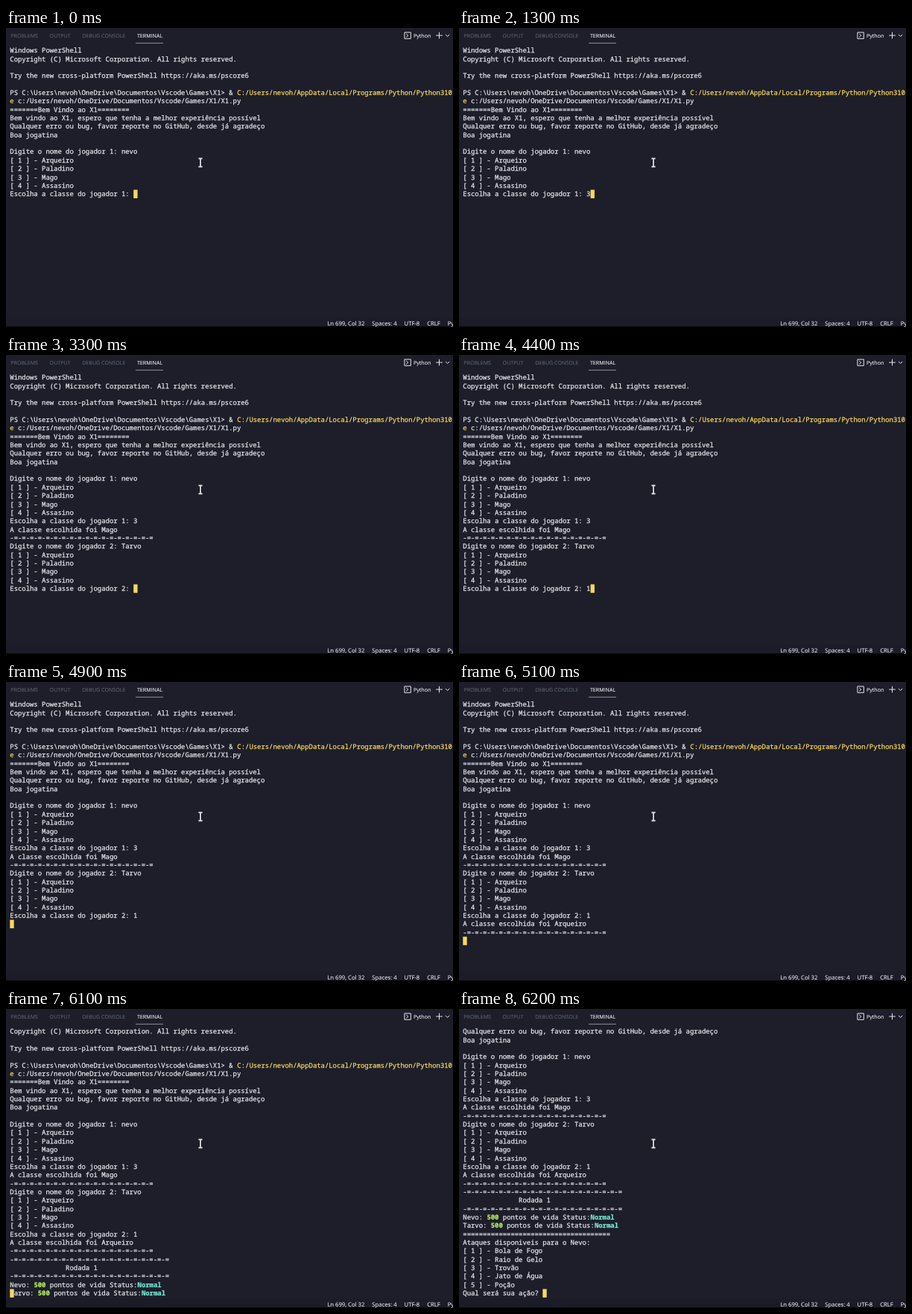
An HTML page with a canvas that plays this animation: 600 px wide and 402 px high, repeating every 8000 ms.

```html
<!DOCTYPE html>
<html lang="pt">
<head>
<meta charset="utf-8">
<title>Terminal</title>
<style>
html, body { margin: 0; width: 100%; height: 100%; overflow: hidden; background: #1d1e2a; }
canvas { display: block; width: 600px; height: 402px; }
</style>
</head>
<body>
<canvas id="stage"></canvas>
<script>
const W = 600, H = 402, LOOP = 8000;
const BG = '#1d1e2a', FG = '#e6e7ec', DIM = '#5c5f6d';
const YELLOW = '#fbd85c', GREEN = '#b5ea62', CYAN = '#74e6d4';
const MONO = '"Noto Sans Mono", "DejaVu Sans Mono", monospace';
const UI = '"Open Sans", "Noto Sans", sans-serif';
const SIZE = 8.92, CELL = SIZE * 0.6, LINE = 11.355;
const LEFT = 5.3, TOP = 24.5, BASE = 8.7, ROWS = 32;

const canvas = document.getElementById('stage');
const ctx = canvas.getContext('2d');
const dpr = window.devicePixelRatio || 1;
canvas.width = W * dpr;
canvas.height = H * dpr;
ctx.scale(dpr, dpr);
ctx.textRendering = 'geometricPrecision';
ctx.lineJoin = 'round';

// The session: each print or key press records the screen from that moment on.
// A row is a plain string or a list of [text, color, bold] spans.
const lines = [], screens = [];

function record(at, col = lines.at(-1).length) {
  screens.push({ at, col, lines: [...lines] });
}

function print(at, rows, col) {
  if (lines.at(-1) === '') lines.pop();
  lines.push(...rows);
  record(at, col);
}

function type(at, keys, pace = 65) {
  [...keys].forEach((key, i) => {
    lines.push(lines.pop() + key);
    record(at + i * pace);
  });
}

const menu = names => names.map((name, i) => `[ ${i + 1} ] - ${name}`);
const rule = n => '-='.repeat(n);
const chosen = name => ['A classe escolhida foi ' + name, rule(18)];
const choose = player => [
  ...menu(['Arqueiro', 'Paladino', 'Mago', 'Assasino']),
  `Escolha a classe do jogador ${player}: `
];
const health = name => [
  [name + ': '], ['500', GREEN, true],
  [' pontos de vida Status:'], ['Normal', CYAN, true]
];

print(0, [
  'Windows PowerShell',
  'Copyright (C) Microsoft Corporation. All rights reserved.',
  '',
  'Try the new cross-platform PowerShell https://aka.ms/pscore6',
  '',
  [['PS C:\\Users\\nevoh\\OneDrive\\Documentos\\Vscode\\Games\\X1> & '],
   ['C:/Users/nevoh/AppData/Local/Programs/Python/Python310/python.ex', YELLOW]],
  [['e', YELLOW], [' c:/Users/nevoh/OneDrive/Documentos/Vscode/Games/X1/X1.py']],
  '=======Bem Vindo ao X1========',
  'Bem vindo ao X1, espero que tenha a melhor experiência possível',
  'Qualquer erro ou bug, favor reporte no GitHub, desde já agradeço',
  'Boa jogatina',
  '',
  'Digite o nome do jogador 1: nevo',
  ...choose(1)
]);
type(1200, '3');
print(1600, [...chosen('Mago'), 'Digite o nome do jogador 2: ']);
type(2600, 'T');
type(2900, 'arvo');
print(3300, choose(2));
type(4400, '1');
print(4900, ['']);
print(5000, [...chosen('Arqueiro'), '']);
print(5900, [rule(20), '']);
print(6000, [' '.repeat(14) + 'Rodada 1', rule(20), '']);
print(6100, [health('Nevo'), health('Tarvo')], 0);
print(6200, [
  '='.repeat(37),
  'Ataques disponiveis para o Nevo:',
  ...menu(['Bola de Fogo', 'Raio de Gelo', 'Trovão', 'Jato de Água', 'Poção']),
  'Qual será sua ação? '
]);

// The thin outline gives the text its medium weight.
function text(str, x, y, font, color, weight = 0.25) {
  ctx.font = font;
  ctx.fillStyle = ctx.strokeStyle = color;
  ctx.lineWidth = weight;
  ctx.fillText(str, x, y);
  ctx.strokeText(str, x, y);
}

// Sets labels side by side with an even gap.
function flow(labels, x, y, gap, size, color) {
  for (const label of labels) {
    text(label, x, y, `${size}px ${UI}`, color(label), 0.12);
    x += ctx.measureText(label).width + gap;
  }
}

function stroke(color, width, ...paths) {
  ctx.strokeStyle = color;
  ctx.lineWidth = width;
  ctx.beginPath();
  for (const [start, ...rest] of paths) {
    ctx.moveTo(...start);
    rest.forEach(p => ctx.lineTo(...p));
  }
  ctx.stroke();
}

function drawRow(row, y) {
  let col = 0;
  for (const [str, color = FG, bold] of typeof row === 'string' ? [[row]] : row) {
    text(str, LEFT + col * CELL, y, `${bold ? 'bold ' : ''}${SIZE}px ${MONO}`, color);
    col += str.length;
  }
}

function drawTerminal(t) {
  const { lines, col } = screens.findLast(s => s.at <= t);
  const visible = lines.slice(-ROWS);
  visible.forEach((row, i) => drawRow(row, TOP + i * LINE + BASE));
  ctx.fillStyle = YELLOW;
  ctx.fillRect(LEFT + col * CELL, TOP + (visible.length - 1) * LINE, CELL, LINE);
}

function drawTabs() {
  flow(['PROBLEMS', 'OUTPUT', 'DEBUG CONSOLE', 'TERMINAL'], 6.3, 12.7, 15.6, 7.1,
    label => label === 'TERMINAL' ? FG : DIM);
  stroke('#8d909c', 1, [[174, 20.3], [211, 20.3]]);

  ctx.strokeStyle = FG;
  ctx.lineWidth = 1;
  ctx.strokeRect(534.9, 5.9, 8.4, 8.4);
  flow(['Python'], 547, 12.7, 0, 7.1, () => FG);
  stroke(FG, 1,
    [[537.2, 7.8], [539.8, 10.1], [537.2, 12.4]],
    [[577.2, 10], [585.8, 10]], [[581.5, 5.7], [581.5, 14.3]],
    [[590, 8.8], [592.6, 11.4], [595.2, 8.8]]);
}

function drawStatus() {
  ctx.fillStyle = '#1b1c28';
  ctx.fillRect(0, 389, W, H - 389);
  ctx.fillStyle = '#08080c';
  ctx.fillRect(0, H - 1, W, 1);
  flow(['Ln 699, Col 32', 'Spaces: 4', 'UTF-8', 'CRLF', 'Python'],
    431.3, 400, 10, 7.7, () => FG);
}

function drawPointer() {
  const x = 261, y = 181, half = 5.5, arm = 2.6;
  const serif = side => [[x - arm, y + side * half], [x + arm, y + side * half]];
  const beam = [serif(-1), [[x, y - half], [x, y + half]], serif(1)];
  stroke('#0c0d14', 3, ...beam);
  stroke('#dcdde2', 1.8, ...beam);
}

function frame(now) {
  ctx.fillStyle = BG;
  ctx.fillRect(0, 0, W, H);
  drawTabs();
  drawTerminal(now % LOOP);
  drawStatus();
  drawPointer();
  requestAnimationFrame(frame);
}
requestAnimationFrame(frame);
</script>
</body>
</html>
```
